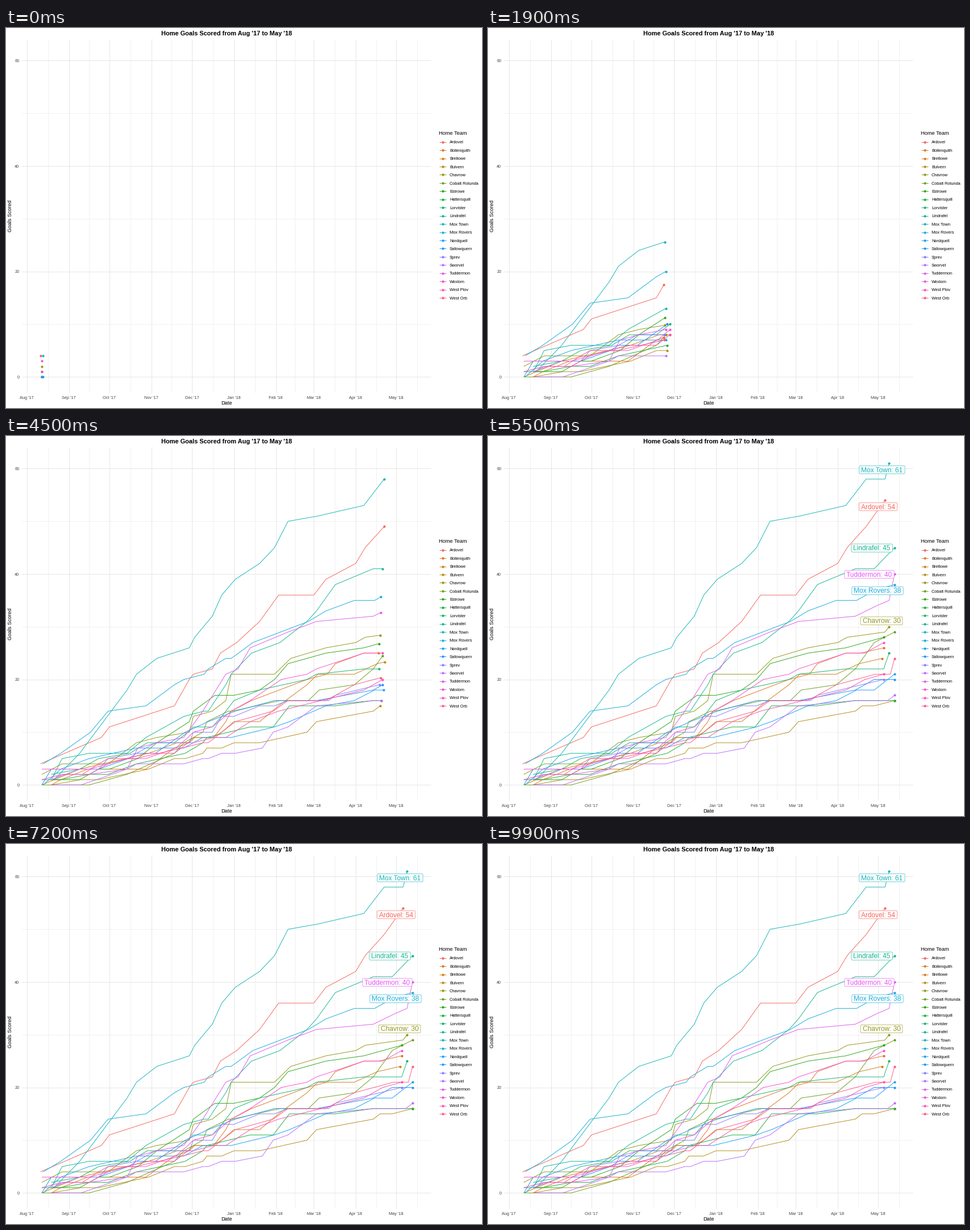
Animation of 837x669 px, one loop 10000 ms. Source, as a matplotlib script:

```python
import numpy as np
import matplotlib.pyplot as plt
from matplotlib.animation import FuncAnimation
from matplotlib.patches import FancyBboxPatch

W, H, DPI = 837, 669, 64
FRAMES, REVEAL = 100, 49        # the chart is complete at step 49, then holds
LAST_DAY = 275
PT = 72 / DPI                   # points per pixel

plt.rcParams["font.family"] = "Liberation Sans"
fig = plt.figure(figsize=(W / DPI, H / DPI), dpi=DPI, facecolor="white")
ax = fig.add_axes([0, 0, 1, 1])
ax.set_xlim(0, W)
ax.set_ylim(H, 0)
ax.axis("off")


def day_x(day):
    return 60.6 + 2.379 * day


def goal_y(goals):
    return 614.3 - 9.283 * goals


def hue(i, n=20):
    """Evenly spaced HCL hue (C 100, L 65), slightly deepened."""
    a = np.radians(15 + 360 * i / n)
    u = 100 * np.cos(a) / (13 * 65) + 0.19784
    v = 100 * np.sin(a) / (13 * 65) + 0.46834
    y = ((65 + 16) / 116) ** 3
    x = 9 * y * u / (4 * v)
    z = -x / 3 - 5 * y + 3 * y / v
    lin = np.array([[3.2405, -1.5371, -0.4985],
                    [-0.9693, 1.8760, 0.0416],
                    [0.0556, -0.2040, 1.0572]]) @ [x, y, z]
    lin = np.clip(lin, 0, 1)
    rgb = np.where(lin > 0.00304, 1.055 * lin ** (1 / 2.4) - 0.055, 12.92 * lin)
    return tuple(np.clip(rgb ** 1.222, 0.09, 1))


def text(x, y, s, size, color="black", ha="left", **kw):
    return ax.text(x, y + 0.36 * size, s, fontsize=size * PT, color=color,
                   ha=ha, va="baseline", **kw)


def line(xs, ys, color, width, z):
    return ax.plot(xs, ys, color=color, lw=width * PT, zorder=z,
                   solid_capstyle="butt", solid_joinstyle="round")[0]


def dot(x, y, color, z):
    return ax.plot(x, y, "o", color=color, ms=4.2 * PT, mew=0, zorder=z)[0]


def draw_axes():
    left, right, top, bottom = 28, 747.3, 19.6, 642.4
    months = "Aug Sep Oct Nov Dec Jan Feb Mar Apr May".split()
    lengths = [31, 30, 31, 30, 31, 31, 28, 31, 30, 31]
    day = -10
    for i, (month, n) in enumerate(zip(months, lengths)):
        x, mid = day_x(day), day_x(day + n / 2)
        line([mid, mid], [top, bottom], "#e9e9e9", 0.6, 0)
        line([x, x], [top, bottom], "#e6e6e6", 1.0, 1)
        text(x, 650, f"{month} '{17 if i < 5 else 18}", 7.37, "#444444", "center")
        day += n
    for goals in range(0, 61, 10):
        y = goal_y(goals)
        major = goals % 20 == 0
        line([left, right], [y, y], "#e6e6e6" if major else "#e9e9e9",
             1.0 if major else 0.6, int(major))
        if major:
            text(23.5, y, str(goals), 7.37, "#444444", "right")
    text(387.6, 9, "Home Goals Scored from Aug '17 to May '18", 11.05,
         ha="center", weight="bold")
    text(387.6, 660, "Date", 9.21, ha="center")
    ax.text(8, 331, "Goals Scored", fontsize=9.21 * PT, rotation=90,
            ha="center", va="center")
    text(761, 185, "Home Team", 9.21)


class Team:
    def __init__(self, i, name, points):
        self.name, self.color = name, hue(i)
        days, goals = np.array(points, float).T
        self.x, self.y = day_x(days), goal_y(goals)
        self.step = np.round(days * REVEAL / LAST_DAY)
        self.total = int(goals[-1])
        self.line = line([], [], self.color, 0.95, 3 + i / 100)
        self.dot = dot([], [], self.color, 4 + i / 100)
        self.tag = []
        y = 200.6 + 14.45 * i
        line([762.4, 774], [y, y], self.color, 0.95, 3)
        dot(768.2, y, self.color, 4)
        text(780, y, name, 7.37)

    def add_tag(self, x, y):
        label = text(x, y, f"{self.name}: {self.total}", 11.9, self.color,
                     "center", zorder=6)
        w = label.get_window_extent().width + 7
        box = FancyBboxPatch((x - w / 2, y - 7), w, 14.2, zorder=5,
                             boxstyle="round,pad=0,rounding_size=2",
                             fc="white", ec=self.color, lw=0.6 * PT)
        ax.add_patch(box)
        self.tag = [label, box]

    def show(self, k):
        started = k >= self.step[0]
        done = self.step <= k
        tip = np.interp(k, self.step, self.x), np.interp(k, self.step, self.y)
        if k >= self.step[-1]:
            tip = self.x[-1], self.y[-1]
        self.line.set_data(np.append(self.x[done], tip[0]),
                           np.append(self.y[done], tip[1]))
        self.dot.set_data([tip[0]], [tip[1]])
        self.line.set_visible(started)
        self.dot.set_visible(started)
        for part in self.tag:
            part.set_visible(k >= self.step[-1])


teams = []


def team(name, *points, tag=None):
    """Points are (days since the opening match, goals so far)."""
    teams.append(Team(len(teams), name, points))
    if tag:
        teams[-1].add_tag(*tag)


draw_axes()
team("Ardovel", (0, 4), (45, 9), (51, 11), (99, 15), (110, 20), (113, 21),
     (127, 22), (133, 25), (145, 27), (162, 31), (176, 36), (202, 36),
     (211, 39), (233, 42), (240, 45), (254, 49), (268, 54), tag=(686, 124.3))
team("Bollenquith", (8, 0), (15, 1), (35, 3), (78, 3), (99, 7), (110, 8),
     (114, 9), (128, 9), (137, 12), (141, 14), (156, 16), (197, 20),
     (212, 21), (218, 23), (239, 25), (250, 25), (267, 26))
team("Brellowe", (1, 0), (29, 3), (80, 6), (101, 8), (109, 8), (113, 9),
     (127, 9), (134, 10), (143, 12), (162, 12), (176, 15), (197, 19),
     (205, 21), (232, 21), (249, 23), (266, 24))
team("Bulvern", (8, 0), (30, 1), (43, 1), (80, 3), (99, 5), (107, 5),
     (120, 6), (123, 7), (134, 7), (143, 8), (162, 8), (197, 10),
     (204, 12), (246, 14), (251, 15), (260, 15), (275, 16))
team("Chavrow", (1, 2), (16, 4), (50, 4), (71, 8), (86, 9), (110, 10),
     (113, 13), (127, 14), (137, 16), (141, 21), (173, 21), (185, 24),
     (211, 26), (233, 27), (240, 28), (268, 29), (271, 30), tag=(692, 325.2))
team("Cobalt Rotunda", (1, 0), (36, 0), (64, 2), (99, 6), (106, 8), (120, 10),
     (123, 12), (139, 14), (142, 14), (177, 16), (198, 16), (206, 18),
     (232, 19), (246, 22), (260, 27), (275, 29))
team("Estrowe", (1, 1), (29, 1), (43, 3), (51, 3), (72, 5), (86, 8),
     (110, 12), (113, 14), (129, 17), (143, 17), (162, 18), (173, 20),
     (183, 23), (211, 25), (239, 26), (267, 28))
team("Hattersquill", (9, 1), (15, 1), (36, 2), (50, 2), (71, 4), (107, 6),
     (120, 8), (123, 9), (155, 11), (172, 11), (184, 15), (218, 15),
     (246, 16), (275, 16))
team("Lorvister", (8, 2), (29, 3), (43, 5), (66, 6), (79, 8), (99, 8),
     (109, 10), (113, 11), (127, 11), (134, 13), (143, 16), (162, 18),
     (197, 20), (204, 21), (239, 22), (267, 22), (271, 25))
team("Lindrafel", (8, 1), (16, 5), (36, 6), (64, 6), (78, 9), (106, 13),
     (121, 14), (124, 14), (137, 19), (141, 21), (156, 25), (177, 27),
     (197, 31), (204, 33), (218, 38), (246, 41), (260, 41), (275, 45),
     tag=(675, 197))
team("Mox Town", (10, 1), (29, 6), (64, 18), (71, 21), (86, 24), (110, 26),
     (114, 28), (127, 32), (134, 36), (144, 39), (162, 42), (173, 45),
     (183, 50), (205, 51), (239, 53), (254, 58), (268, 58), (271, 61),
     tag=(693, 59.4))
team("Mox Rovers", (2, 4), (15, 6), (37, 10), (50, 14), (78, 15), (99, 19),
     (106, 20), (121, 21), (124, 22), (137, 24), (141, 24), (157, 27),
     (198, 31), (211, 33), (232, 35), (247, 35), (261, 37), (275, 38),
     tag=(685, 272.2))
team("Nordquell", (2, 0), (15, 3), (36, 5), (71, 7), (106, 7), (120, 9),
     (141, 9), (173, 11), (184, 12), (211, 15), (232, 16), (247, 18),
     (260, 18), (275, 21))
team("Sallowquern", (1, 0), (8, 3), (43, 3), (65, 5), (71, 6), (85, 6),
     (107, 10), (124, 12), (144, 14), (173, 16), (204, 16), (246, 18),
     (260, 20), (275, 20))
team("Sprev", (8, 1), (29, 3), (43, 3), (50, 5), (71, 6), (85, 8),
     (110, 8), (113, 10), (127, 10), (134, 13), (143, 13), (162, 15),
     (173, 15), (183, 16), (213, 16), (218, 17), (267, 20))
team("Sworvel", (8, 0), (30, 0), (64, 3), (71, 4), (106, 4), (120, 5),
     (124, 5), (134, 6), (144, 6), (164, 7), (172, 10), (183, 11),
     (204, 15), (246, 16), (270, 16), (275, 17))
team("Tuddermon", (9, 1), (16, 2), (36, 2), (64, 3), (72, 7), (86, 8),
     (106, 9), (120, 14), (137, 21), (146, 22), (155, 26), (183, 29),
     (204, 31), (246, 32), (262, 34), (271, 35), (275, 40), tag=(670.5, 243.5))
team("Wexlorn", (1, 3), (36, 3), (64, 5), (78, 5), (100, 7), (109, 9),
     (113, 10), (127, 11), (141, 14), (155, 16), (178, 20), (197, 21),
     (204, 22), (239, 25), (253, 25), (267, 27))
team("West Plov", (1, 1), (16, 2), (36, 2), (50, 4), (78, 6), (99, 6),
     (109, 8), (113, 8), (128, 9), (137, 9), (155, 12), (176, 14),
     (239, 18), (253, 20), (267, 21))
team("West Orb", (31, 2), (43, 4), (50, 5), (70, 5), (105, 7), (120, 8),
     (124, 8), (144, 12), (172, 14), (183, 16), (211, 16), (232, 19),
     (261, 21), (272, 21), (275, 24))


def update(frame):
    for t in teams:
        t.show(min(frame, REVEAL))
    return []


anim = FuncAnimation(fig, update, frames=FRAMES, interval=100,
                     init_func=lambda: update(0), repeat=True, repeat_delay=0)
plt.show()
```
